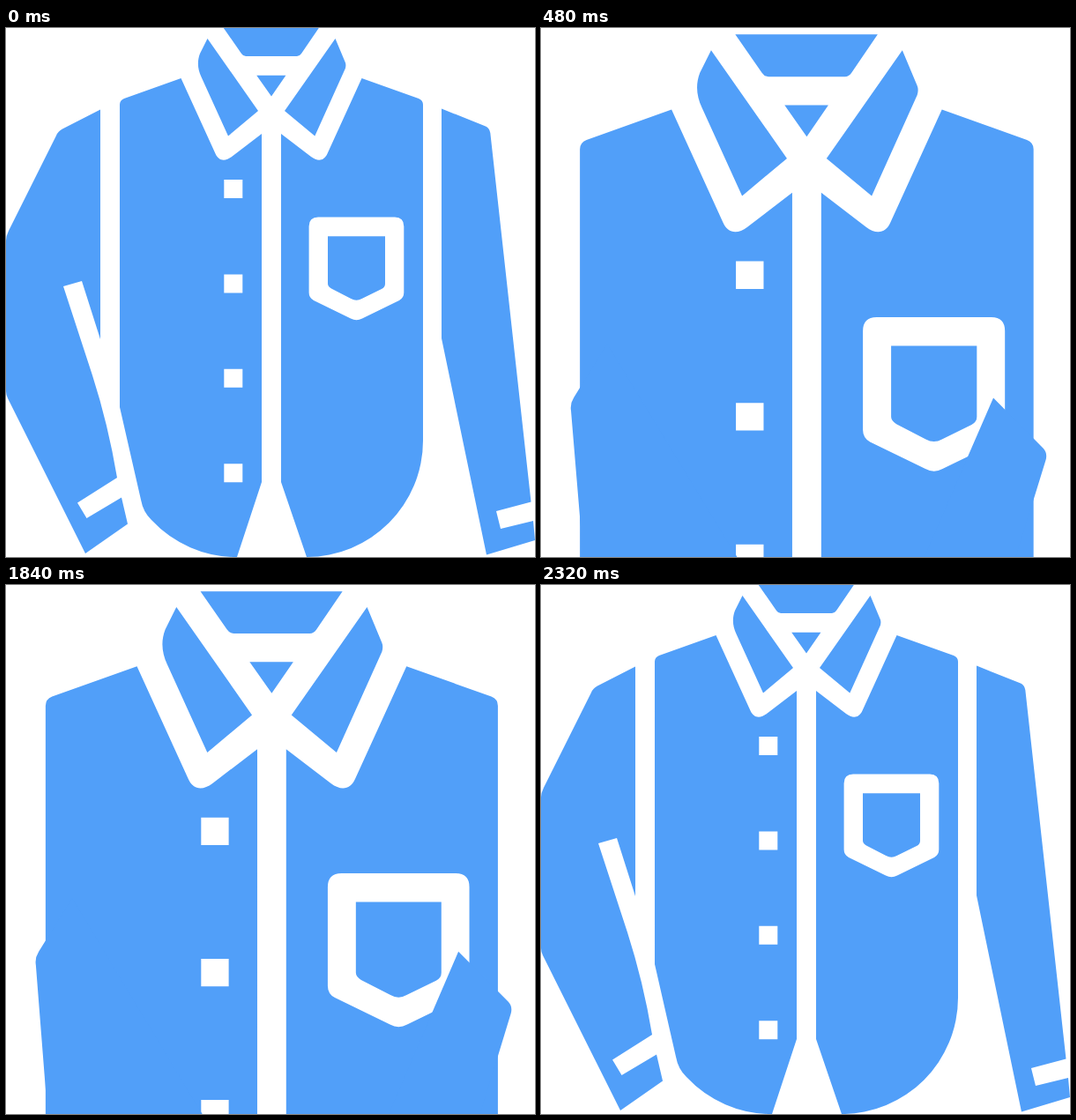
Write an HTML page that moves like this. It is 600 by 600 pixels and loops after 3000 ms.

```html
<!DOCTYPE html>
<html lang="en">
<head>
<meta charset="utf-8">
<title>Shirt folding</title>
<style>
  html, body { margin: 0; width: 100%; height: 100%; overflow: hidden; background: #fff; }
  svg { display: block; width: 100%; height: 100%; }
</style>
</head>
<body>
<svg viewBox="0 0 600 600" fill="#519ff9">
  <clipPath id="fold"><rect id="cut" x="-400" y="-20" width="1400"/></clipPath>
  <g id="shirt" clip-path="url(#fold)">
    <!-- body halves, buttons and pocket -->
    <path fill-rule="evenodd" d="
      M198.5 57L134 80Q129 82 129 87V430L153 535Q155.5 549 165 558A132 132 0 0 0 262 600L290 515V120
      L256 146C248 152 241 150.500 237.500 142.500Z
      M403.500 57L468 80Q473 82 473 87V468A132 132 0 0 1 341 600L312 515V120
      L346 146C354 152 361 150.500 364.500 142.500Z
      M247.300 172h21v21h-21z m0 107.400h21v21h-21z m0 107.400h21v21h-21z m0 107.400h21v21h-21z
      M354 214.500H441Q451.300 214.500 451.300 225V300Q451.300 306 446 309L404 329.500Q397.500 333 391 329.500
      L349 309Q343.600 306 343.600 300V225Q343.600 214.500 354 214.500Z
      M365 236.200H430V290Q430 294 426 296L403.600 307Q397.500 310.500 391.300 307L369 295.500Q365 293 365 290Z"/>
    <!-- collar -->
    <path d="
      M228.500 12L286 94L252 122.500L221.500 55.500C217.500 47 216.500 38 220 29Z
      M373.500 12L384.800 39Q386 42 384.800 46L350.300 122.500L316 94Z
      M246.800 0H354.800L335 29Q333 32 330 32H272Q269 32 267 29Z
      M284.200 53.700H317.400L301 77.500Z"/>
    <path id="left" d="
      M107 92.500V353L86 287L65 293L98 394Q116 450 126 510L81 538.500L91.500 556L131 532.500L138 562.500L90 596
      L2 420Q0 416 0 412V241Q0 236 3 230L57 122Q59 117 64 114.500Z"/>
    <path id="right" d="
      M494 91.500L544 111.500Q548.500 113.500 549.300 119L595.500 537.500L556 548L561 568L598 559L600 581
      L545 597.500L494 352Z"/>
  </g>
</svg>
<script>
const LOOP = 3000, STEP = 40, MOVE = 833, BACK = 1500;
const el = id => document.getElementById(id);

// cubic-bezier(.77, 0, .2, 1)
function ease(x) {
  if (x <= 0) return 0;
  if (x >= 1) return 1;
  let lo = 0, hi = 1, t;
  for (let i = 0; i < 24; i++) {
    t = (lo + hi) / 2;
    const bx = 3 * .77 * t * (1 - t) ** 2 + 3 * .2 * t * t * (1 - t) + t ** 3;
    if (bx < x) lo = t; else hi = t;
  }
  return t * t * (3 - 2 * t);
}

// Turn a sleeve about (px, py) while shifting it by (dx, dy)
function sleeve(id, e, px, py, dx, dy, angle) {
  el(id).setAttribute('transform',
    `translate(${px + dx * e} ${py + dy * e}) rotate(${angle * e}) translate(${-px} ${-py})`);
}

function draw(t) {
  const e = ease(t / MOVE) - ease((t - BACK) / MOVE);
  el('shirt').setAttribute('transform',
    `translate(${301 + .5 * e} ${9.3 * e}) scale(${1 + .633 * e}) translate(-301 0)`);
  sleeve('left', e, 133, 97, 52.6, 163, -40);
  sleeve('right', e, 494, 92, -66, 235, 30);
  el('cut').setAttribute('height', 20 + 620 + (358.4 - 620) * e);
}

const start = performance.now();
function tick() {
  const t = (performance.now() - start) % LOOP;
  draw(Math.floor(t / STEP) * STEP);
  requestAnimationFrame(tick);
}
tick();
</script>
</body>
</html>
```
